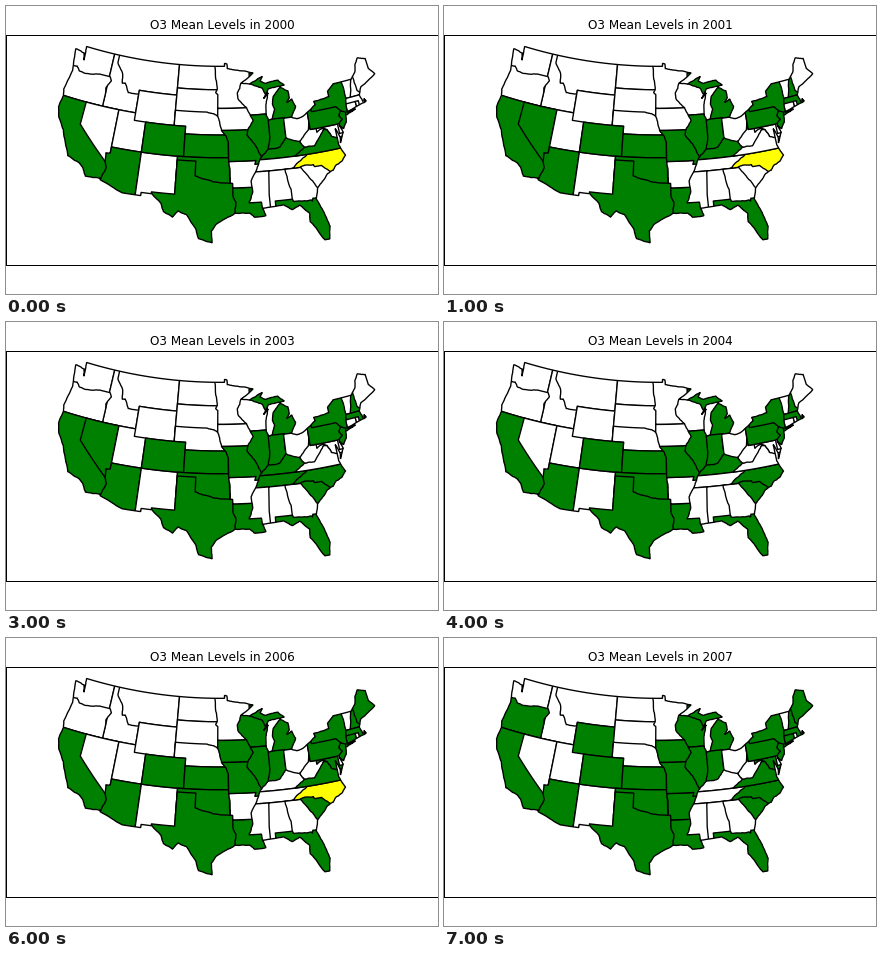
These frames come from a looping animation (432 by 288 pixels, 8 s). A matplotlib script:

```python
import numpy as np
import matplotlib.pyplot as plt
from matplotlib.animation import FuncAnimation
from matplotlib.collections import PolyCollection
from matplotlib.path import Path

plt.rcParams["text.kerning_factor"] = 6
plt.rcParams["axes.linewidth"] = 1

W, H, DPI = 432, 288, 72
MAP_H = 230
EDGE = 1.35

# Lambert conformal conic projection
LON0, LAT1, LAT2 = 96, np.radians(33), np.radians(45)


def spread(lat):
    return np.tan(np.pi / 4 + lat / 2)


CONE = np.log(np.cos(LAT1) / np.cos(LAT2)) / np.log(spread(LAT2) / spread(LAT1))
SIZE = np.cos(LAT1) * spread(LAT1) ** CONE / CONE


def project(west, lat):
    rho = SIZE / spread(np.radians(lat)) ** CONE
    theta = CONE * np.radians(LON0 - west)
    return np.array([rho * np.sin(theta), -rho * np.cos(theta)])


rng = np.random.default_rng(4)


def side(a, b, rough):
    """Points from a to b: even along meridians and parallels, else wandering."""
    if rough == 0 or np.any(a == b):
        return list(a + (b - a) * np.linspace(0, 1, 24, endpoint=False)[:, None])
    pts = [a, b]
    for _ in range(3):
        longer = []
        for p, q in zip(pts, pts[1:]):
            d = q - p
            bend = rough * rng.uniform(-1, 1) / np.hypot(*d) ** 0.5
            longer += [p, (p + q) / 2 + bend * np.array([-d[1], d[0]])]
        pts = longer + [b]
    return pts[:-1]


def ring(corners, rough):
    """Closed shape on the map from degrees west and north in turn."""
    pts = np.array(corners, float).reshape(-1, 2)
    sides = [side(a, b, rough) for a, b in zip(pts, np.roll(pts, -1, axis=0))]
    return project(*np.array(sum(sides, [])).T).T


# Each state hides the ones before it, so a border is given only once.
# Outer sides run past the coast and are cut off there.
names, cells = [], []


def state(name, *corners, rough=0.05):
    names.append(name)
    cells.append(ring(corners, rough))


def box(name, w, e, s, n):
    state(name, w, n, e, n, e, s, w, s)


# West
box("WA", 126, 117.04, 45, 50)
box("ID", 117.04, 111.05, 42, 50)
state("OR", 126, 46.3, 123.4, 46.2, 122.8, 45.7, 121.2, 45.65, 119, 46, 116.92, 46,
      116.5, 45.5, 117.2, 44.4, 117.03, 43.8, 117.03, 42, 126, 42)
state("MT", 116.05, 50, 116.05, 48, 114.7, 46.7, 114.4, 45.5, 113.9, 45.6, 113, 44.45,
      111.05, 44.5, 111.05, 45, 104.05, 45, 104.05, 50)
box("CA", 126, 114, 32, 42)
state("NV", 120, 42, 114.05, 42, 114.05, 35.4, 114.63, 35, 120, 39, rough=0)
box("UT", 114.05, 109.05, 37, 42)
box("WY", 111.05, 104.05, 41, 45)
state("AZ", 114.05, 37, 109.05, 37, 109.05, 31, 115, 31, 114.72, 32.72, 114.5, 33.4,
      114.2, 34.2, 114.63, 35, 114.75, 36.1, 114.05, 36.2)
box("NM", 109.05, 103.04, 31, 37)

# Plains
box("ND", 104.05, 95, 45.94, 50)
box("SD", 104.05, 95, 42, 45.94)
state("NE", 104.05, 43, 98.5, 43, 97.2, 42.8, 96.45, 42.5, 95, 42, 95, 40, 102.05, 40,
      102.05, 41, 104.05, 41)
box("CO", 109.05, 102.05, 37, 41)
box("KS", 102.05, 94.62, 37, 40)
box("OK", 103.04, 94.5, 33.4, 37)
box("LA", 95, 88.5, 28, 33.02)
state("TX", 103.04, 36.5, 100, 36.5, 100, 34.56, 98.1, 34.1, 96.6, 33.8, 94.04, 33.6,
      94.04, 32, 93.6, 31.1, 93.8, 29.7, 93.8, 25, 107, 25, 106.62, 32, 103.04, 32)

# Along the Mississippi
state("AR", 94.62, 36.5, 89, 36.5, 89, 33.02, 94.04, 33.02, 94.04, 33.6, 94.45, 33.65,
      94.43, 35.4)
state("MN", 97.23, 50, 89, 50, 89, 43.5, 96.45, 43.5, 96.45, 45.3, 96.85, 45.6,
      96.56, 46, 96.85, 47.3)
state("IA", 96.45, 43.5, 90, 43.5, 90, 40.6, 95.77, 40.6, 96.1, 41.7, 96.45, 42.5)
state("MO", 95.77, 40.6, 88.5, 40.6, 88.5, 36, 90.37, 36, 90.15, 36.5, 94.62, 36.5,
      94.62, 39.1, 94.95, 39.8)
state("WI", 92.1, 46.7, 92.3, 46.1, 92.8, 45.5, 92.7, 44.7, 91.22, 43.5, 90.64, 42.5,
      86.5, 42.5, 86.5, 47.2, 90.5, 47.3)
state("IL", 90.64, 42.5, 86.5, 42.5, 86.5, 37, 89.13, 36.9, 89.5, 37.4, 90.2, 38.7,
      91.4, 39.9, 91.1, 40.8, 90.2, 41.8)

# Lakes and the Ohio
state("MI", 90.4, 46.57, 88.1, 45.9, 87.6, 45.1, 86.9, 45.5, 86.9, 41.7, 82, 41.7,
      82, 48, 90.4, 48)
state("IN", 87.53, 41.76, 84.81, 41.76, 84.81, 38, 88, 37.5, 88, 37.9, 87.53, 39.35)
state("OH", 84.81, 41.7, 83.4, 41.7, 82, 42.3, 80.52, 42.3, 80.52, 38, 84.81, 38)
state("KY", 89.5, 36.55, 89.1, 37, 88, 37.85, 86, 38, 84.81, 39.1, 83.7, 38.65,
      82.6, 38.4, 81.97, 37.54, 81, 37, 81, 36.55)

# Southeast
state("TN", 90.3, 35, 89.5, 36.55, 81, 36.55, 81, 35)
state("MS", 90.3, 35, 91.1, 33.9, 90.95, 32.4, 91.6, 31, 89.73, 31, 89.6, 30.1,
      88, 30.1, 88, 35)
state("AL", 88.2, 35, 84.8, 35, 84.8, 30, 88.4, 30, 88.45, 31.9, rough=0)
state("GA", 85.6, 35, 82, 35, 80, 32, 80, 30, 85, 30, 85, 32.3)
state("FL", 87.6, 31, 85, 31, 84.86, 30.7, 82.2, 30.57, 82, 30.4, 81.9, 30.75,
      79, 30.7, 79, 24, 87.6, 24)
state("NC", 81.68, 36.55, 75, 36.55, 75, 33, 81, 33, 82.6, 35, 84.32, 35, 83.5, 35.6)
state("SC", 83.1, 35, 82.4, 35.2, 81, 35.1, 80.8, 34.8, 79.7, 34.8, 78.4, 33.7,
      79, 31.9, 80.8, 31.9, 81.5, 33)

# Mid-Atlantic
state("WV", 80.52, 40.64, 80.52, 39.72, 77.7, 39.72, 77.7, 39.2, 80, 37, 81.97, 37.54,
      82.6, 38.4, 81.8, 39, 80.85, 39.7)
state("MD", 79.48, 39.72, 75, 39.72, 75, 38, 77, 38, 77.7, 39.3, 78.4, 39.6, 79.48, 39.2)
state("VA", 83.68, 36.55, 75, 36.55, 75, 38, 76.3, 38, 77.2, 38.3, 77.7, 39.3,
      78.3, 39.4, 78.9, 38.8, 80.3, 37.5, 81.97, 37.54)
box("DE", 75.75, 75, 38.45, 39.8)
box("PA", 80.52, 74, 39.72, 42.4)

# Northeast
box("ME", 71.5, 66, 43, 48)
box("VT", 73.6, 71.3, 42.74, 45.1)
state("NH", 71.5, 45.5, 71.5, 45, 72.46, 42.74, 70.5, 42.74, 70.6, 43.1, 70.97, 43.4,
      71.08, 45.5)
box("MA", 73.6, 69, 41, 42.74)
box("CT", 73.6, 71.8, 40.8, 42.04)
box("RI", 71.8, 71.25, 41, 42.04)
state("NY", 79.76, 42, 75.35, 42, 74.7, 41.36, 74.2, 40.4, 71.7, 40.4, 71.7, 41.2,
      73.65, 41, 73.5, 42.04, 73.27, 42.75, 73.35, 45.1, 79.76, 45.1)
state("NJ", 74.7, 41.36, 73.9, 41, 74.02, 40.6, 73.6, 40.4, 73.6, 38.8, 75, 38.8,
      75.5, 39.5, 75.4, 39.8, 74.75, 40.2, 75.2, 40.7)

# Key points of the national outline, clockwise
lakes = [122.8, 49, 95.15, 49, 95.15, 49.38, 94.7, 49.3, 94.6, 48.7, 92.6, 48.45,
         89.6, 48, 92.05, 46.72, 90.4, 46.6, 87.9, 47.45, 88.4, 46.9, 87.4, 46.5,
         85, 46.75, 83.9, 46, 87, 45.75, 88, 44.55, 87.1, 45.25, 87.7, 43.7, 87.8, 42.3,
         87.4, 41.65, 86.8, 41.76, 86.2, 43, 86.5, 43.7, 86.2, 44.7, 84.75, 45.78,
         83.4, 45.2, 83.3, 44.3, 83.9, 43.7, 82.9, 44.07, 82.4, 43, 83.4, 41.7,
         82.5, 41.4, 81.7, 41.5, 78.9, 42.8, 79.05, 43.27, 76.2, 43.5, 76.2, 44.2, 74.9, 45]
atlantic = [71.5, 45, 70.4, 45.8, 70, 46.7, 69.2, 47.45, 67.8, 47.07, 67.8, 45.7,
            66.96, 44.8, 70.1, 43.7, 70.8, 42.7, 70.5, 41.8, 70.1, 41.8, 70.2, 42.1,
            69.9, 41.7, 71.1, 41.5, 73.7, 40.93, 72.1, 41.1, 74, 40.6, 74.2, 39.7,
            74.9, 38.95, 75.5, 39.5, 75.1, 38.5, 75.95, 37.2, 75.8, 38, 76.3, 39.2,
            76.3, 37, 75.6, 35.5, 76.4, 34.8, 77.4, 34.5, 78, 33.9, 79, 33.6,
            80.9, 32, 81.4, 30.6]
gulf = [80.5, 28.4, 80.05, 26.8, 80.4, 25.2, 81.1, 25.2, 82.8, 27.8, 82.7, 28.9,
        84, 30.1, 85.2, 29.65, 86.4, 30.4, 89.6, 30.2, 89.2, 29.2, 90.9, 29.1,
        91.6, 29.65, 93.8, 29.7, 96.6, 28.3, 97.3, 27.4, 97.15, 25.9]
mexico = [99.1, 26.4, 99.5, 27.5, 101, 29.4, 102.3, 29.85, 103.1, 29, 104.5, 29.6,
          105, 30.65, 106.5, 31.76, 108.2, 31.76, 108.2, 31.34, 111.05, 31.34,
          114.8, 32.5, 114.72, 32.7, 117.12, 32.53]
pacific = [117.9, 33.6, 118.5, 34, 120.6, 34.55, 122.5, 37.7, 123.75, 39, 124.4, 40.35,
           124.2, 42, 124.5, 42.8, 124, 45.5, 124.7, 48.3, 122.9, 48.1, 122.5, 47.2]
nation = ring(lakes + atlantic + gulf + mexico + pacific, 0.04)

# Green every year, then (more green, yellow) for each year from 2000
ALWAYS = "CA AZ CO KS OK TX LA IL MI FL NY PA NJ "
LATE = "MO IN IA WI VA SC NH MA CT ME MD "
YEARS = [
    ("MO IN KY VA", "NC"),
    ("MO IN KY NV NH MA", "NC"),
    ("MO NV NH MA", "IN KY TN NC"),
    ("MO IN KY TN NC SC NV NH MA", ""),
    ("MO IN KY NC SC NH MA", ""),
    ("IN NH MA", "MO NC"),
    (LATE, "NC"),
    (LATE + "NC OR WY AR", ""),
]

fig = plt.figure(figsize=(W / DPI, H / DPI), dpi=DPI, facecolor="white")
ax = fig.add_axes([0, 29 / H, 1, MAP_H / H])
left, right = project(125, 20)[0], project(66.5, 20)[0]
top = project(66.5, 50)[1]
ax.set_xlim(left, right)
ax.set_ylim(top - (right - left) * MAP_H / W, top)
ax.set_xticks([])
ax.set_yticks([])

states = PolyCollection(cells, edgecolors="black", linewidths=EDGE)
ax.add_collection(states, autolim=False)
states.set_clip_path(Path(nation), ax.transData)
ax.add_patch(plt.Polygon(nation, fill=False, edgecolor="black", linewidth=EDGE, zorder=3))
title = ax.set_title("", fontsize=12, fontfamily="DejaVu Sans")


def draw(i):
    more, yellow = YEARS[i]
    green, yellow = (ALWAYS + more).split(), yellow.split()
    states.set_facecolor(["yellow" if n in yellow else "green" if n in green else "white"
                          for n in names])
    title.set_text(f"O3 Mean Levels in {2000 + i}")
    return states, title


anim = FuncAnimation(fig, draw, frames=len(YEARS), interval=1000, repeat=True,
                     repeat_delay=0, blit=False)
plt.show()
```
